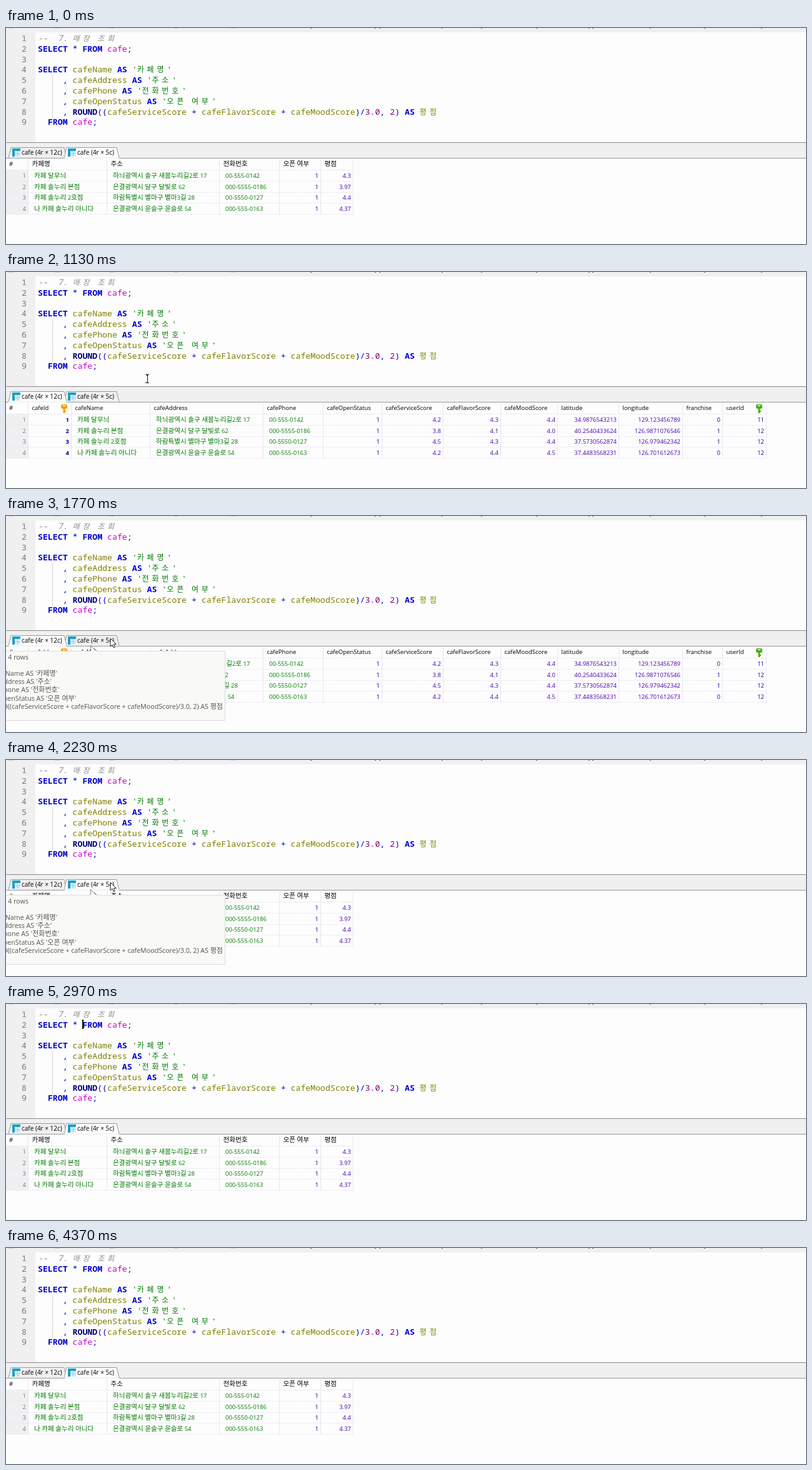
Animation, 1280 px wide and 346 px high, one loop 4410 ms. Source, as an HTML page:

```html
<!DOCTYPE html>
<html lang="ko">
<head>
<meta charset="utf-8">
<title>Cafe query</title>
<style>
html, body { margin: 0; width: 100%; height: 100%; overflow: hidden; background: #fdfdfd; }
svg { display: block; width: 1280px; height: 346px; }
text { font: 500 9.5px "Open Sans", "Noto Sans", sans-serif; white-space: pre; }
.h { font: 500 10.6px "Noto Sans CJK KR", "Noto Sans CJK", sans-serif; }
.code text { font: 13.22px "Noto Sans Mono", monospace; fill: #0000c8; }
.code .h { font-size: 12px; font-weight: 400; letter-spacing: 4.82px; }
.code .note { fill: #8c8c8c; font-style: italic; }
.code .note .h { font-style: italic; }
.code .num { fill: #777; }
.kw { fill: #0000d0; font-weight: bold; }
.fn { fill: #000080; font-weight: bold; }
.col { fill: #808000; }
.tbl { fill: #d000d0; }
.str { fill: #007a00; }
.lit { fill: #800080; }
.tab { font-size: 10px; }
.key { fill: #0000a0; font-weight: bold; }
.int { fill: #1800a8; }
.real { fill: #4800b0; }
.row { fill: #777; }
.tip text { font-size: 10.7px; font-weight: 400; fill: #555; }
.tip .h { font-size: 11px; font-weight: 400; }
.line { fill: none; shape-rendering: crispEdges; }
</style>
</head>
<body>
<svg id="stage" viewBox="0 0 1280 346"></svg>
<script>
const LOOP = 4410;
const PANEL = '#f0f0f1';

const hangul = s => s.replace(/[가-힣]+/g, '<tspan class="h">$&</tspan>');
const text = (x, y, s, cls = '', anchor = 'start') =>
  `<text x="${x}" y="${y}" class="${cls}" text-anchor="${anchor}">${hangul(s)}</text>`;
const rect = (x, y, w, h, fill) => `<rect x="${x}" y="${y}" width="${w}" height="${h}" fill="${fill}"/>`;
const line = (d, color, extra = '') => `<path class="line" d="${d}" stroke="${color}" ${extra}/>`;
const group = (id, body, cls = '') => `<g id="${id}" class="${cls}">${body}</g>`;

// Editor
const sql = [
  '--  7. 매장 조회',
  'SELECT * FROM cafe;',
  '',
  "SELECT cafeName AS '카페명'",
  "     , cafeAddress AS '주소'",
  "     , cafePhone AS '전화번호'",
  "     , cafeOpenStatus AS '오픈 여부'",
  '     , ROUND((cafeServiceScore + cafeFlavorScore + cafeMoodScore)/3.0, 2) AS 평점',
  '  FROM cafe;'
];

function tokenClass(s) {
  if (s[0] === "'") return 'str';
  if (s === 'ROUND') return 'fn';
  if (/^[A-Z]/.test(s)) return 'kw';
  if (s === 'cafe') return 'tbl';
  return /^\d/.test(s) ? 'lit' : 'col';
}

const highlight = s => s.replace(/'[^']*'|SELECT|FROM|AS|ROUND|cafe\w*|\d[\d.]*|[가-힣]+/g,
  m => `<tspan class="${tokenClass(m)}">${m}</tspan>`);

function editor() {
  const rows = sql.map((s, i) => {
    const y = 21 + 16.8 * i;
    return text(25, y, String(i + 1), 'num') +
      (i ? text(51, y, highlight(s)) : text(51, y, s, 'note'));
  });
  const specks = [487, 590, 597, 697, 760, 848, 932, 938, 1030, 1117, 1208];
  return rect(0, 0, 1280, 7, PANEL) + rect(0, 7, 47, 176, PANEL) +
    [4, 78, 165, 268, 360].map(x => rect(x, 0, 8, 1, '#ccccd4')).join('') +
    specks.map(x => rect(x, 0, 2, 1, '#666')).join('') +
    line('M74.5 76V143', '#aaa', 'stroke-dasharray="1 1"') + rows.join('');
}

// Result tabs
function tab(x, right, label, active) {
  const fill = active ? '#fdfdfd' : PANEL;
  const icon = rect(x + 6, 193, 13, 13, '#d4eef6') + rect(x + 6, 193, 13, 4, '#1a9fc0') +
    rect(x + 6, 193, 4, 13, '#1a9fc0') +
    line(`M${x + 10} 201.5h9M${x + 14.5} 197v9`, '#9ad0e2');
  return `<path d="M${x} 207.5L${x + 4} 191.5H${right - 4}L${right} 207.5" fill="${fill}" stroke="#999"/>` +
    icon + text(x + 21, 203, label, 'tab');
}

function tabs(active) {
  const list = [tab(4, 97, 'cafe (4r × 12c)', active === 0), tab(93, 181, 'cafe (4r × 5c)', active === 1)];
  const base = active ? 'M0 208.5H94M181 208.5H1280' : 'M0 208.5H4M97 208.5H1280';
  return (active ? list[0] + list[1] : list[1] + list[0]) + line(base, '#999');
}

// Result grids: each column is [left edge, title, kind, values]
const names = ['카페 달무늬', '카페 솔누리 본점', '카페 솔누리 2호점', '나 카페 솔누리 아니다'];
const places = ['하늬광역시 솔구 새봄누리길2로 17', '은결광역시 달구 달빛로 62',
  '하람특별시 별마구 별마3길 28', '은결광역시 윤슬구 윤슬로 54'];
const phones = ['00-555-0142', '000-5555-0186', '00-5550-0127', '000-555-0163'];
const open = [1, 1, 1, 1];

const summary = [
  [36, '카페명', 'str', names], [162, '주소', 'str', places], [342, '전화번호', 'str', phones],
  [438, '오픈 여부', 'int', open], [504, '평점', 'real', ['4.3', '3.97', '4.4', '4.37']]
];
const full = [
  [36, 'cafeId', 'key', [1, 2, 3, 4]],
  [105, 'cafeName', 'str', names],
  [231, 'cafeAddress', 'str', places],
  [412, 'cafePhone', 'str', phones],
  [508, 'cafeOpenStatus', 'int', open],
  [602, 'cafeServiceScore', 'real', ['4.2', '3.8', '4.5', '4.2']],
  [700, 'cafeFlavorScore', 'real', ['4.3', '4.1', '4.3', '4.4']],
  [792, 'cafeMoodScore', 'real', ['4.4', '4.0', '4.4', '4.5']],
  [883, 'latitude', 'real', ['34.9876543213', '40.2540433624', '37.5730562874', '37.4483568231']],
  [981, 'longitude', 'real', ['129.123456789', '126.9871076546', '126.979462342', '126.701612673']],
  [1083, 'franchise', 'int', [0, 1, 1, 0]],
  [1147, 'userId', 'int', [11, 12, 12, 12]]
];

function grid(cols, end) {
  const rowY = i => Math.round(240 + 17.6 * i);
  let out = rect(0, 228, 36, 70, PANEL) + text(5, 221, '#');
  for (let i = 0; i < 4; i++) {
    out += text(32, rowY(i), String(i + 1), 'row', 'end');
    out += line(`M0 ${Math.round(245 + 17.6 * i)}.5H${end}`, '#e6e6f4', 'stroke-dasharray="2 1"');
  }
  cols.forEach(([left, title, kind, values], c) => {
    const right = c + 1 < cols.length ? cols[c + 1][0] : end;
    out += line(`M${left - .5} 210V298M${right - .5} 210V298`, '#e6e6f2') + text(left + 5.5, 221, title);
    values.forEach((v, i) => {
      out += kind === 'str' ? text(left + 9, rowY(i), v, kind)
        : text(right - 4, rowY(i), String(v), kind, 'end');
    });
  });
  return out + line(`M0 227.5H${end}`, '#ececf4');
}

const keyIcon = (x, color) =>
  `<rect x="${x - 5}" y="212" width="10" height="7" rx="2.5" fill="${color}"/>` +
  rect(x - 2, 213.5, 4, 1.5, '#fff') + rect(x - 1.5, 219, 3, 7, color) + rect(x, 222, 3, 2, color);

// Balloon hint over the tab
function balloon() {
  const rows = [
    [36, 229.5, '4 rows'], [82, 256, "SELECT cafeName AS '카페명'"], [73, 269, ", cafeAddress AS '주소'"],
    [85, 282, ", cafePhone AS '전화번호'"], [112, 295.5, ", cafeOpenStatus AS '오픈 여부'"],
    [347, 309, ', ROUND((cafeServiceScore + cafeFlavorScore + cafeMoodScore)/3.0, 2) AS 평점']
  ];
  return '<path d="M-5 216.5H135.5V207.5L144.5 216.5H350.5V327.5H-5Z" fill="#f9f9f7" stroke="#dcdce0"/>' +
    line('M135.5 216V207.5L144.5 216', '#888') +
    rows.map(([x, y, s]) => text(x, y, s, '', 'end')).join('');
}

const stage = document.getElementById('stage');
stage.innerHTML =
  group('editor', editor(), 'code') +
  rect(0, 183, 1280, 26, PANEL) + line('M0 183.5H1280', '#888') +
  group('fullView', rect(0, 209, 1280, 137, '#fdfdfd') + tabs(0) + grid(full, 1217) +
    keyIcon(93, '#f5a010') + keyIcon(1205, '#48b010')) +
  group('summaryView', rect(0, 209, 1280, 137, '#fdfdfd') + tabs(1) + grid(summary, 556)) +
  group('blank', rect(0, 209, 1280, 137, '#f9f9f6')) +
  group('popup', line('M173.5 8V94', '#ccc') + line('M0 94.5H174', '#999')) +
  group('caret', rect(122, 25, 2, 15, '#000')) +
  group('hint', balloon(), 'tip') +
  group('arrow', '<path d="M0 0V13L3 10.2L5.2 15L7.4 14L5.3 9.4H9.3Z" fill="#fff" stroke="#222"/>') +
  group('beam', line('M-3 -6.5H-1L0 -5.5L1 -6.5H3M.5 -6V6M-3 6.5H3', '#111'));

const el = id => document.getElementById(id);
const show = (id, on) => el(id).setAttribute('visibility', on ? 'visible' : 'hidden');

// Pointer stops: [time, x, y]
const path = [[1000, 238, 158], [1130, 226, 171], [1450, 167, 196], [2520, 167, 196], [2700, 190, 150]];

function pointer(t) {
  const i = path.findIndex(([end], k) => k && t < end);
  if (i < 1 || t < path[0][0]) return null;
  const [t0, x0, y0] = path[i - 1], [t1, x1, y1] = path[i];
  const p = (t - t0) / (t1 - t0), e = p * p * (3 - 2 * p);
  return [x0 + (x1 - x0) * e, y0 + (y1 - y0) * e];
}

function draw(t) {
  const within = (a, b) => t >= a && t < b;
  const first = within(530, 2000);
  show('fullView', first);
  show('summaryView', !first);
  show('blank', within(400, 530));
  show('popup', within(430, 500));
  show('hint', within(1570, 2700));

  const blink = Math.floor(((t - 2700 + LOOP) % LOOP) / 530) % 2 === 0;
  show('caret', blink && !within(950, 2700));

  const at = pointer(t), inEditor = at && at[1] < 183;
  show('beam', inEditor);
  show('arrow', at && !inEditor);
  if (at) el(inEditor ? 'beam' : 'arrow').setAttribute('transform', `translate(${at})`);
}

const start = performance.now();
function tick() {
  draw((performance.now() - start) % LOOP);
  requestAnimationFrame(tick);
}
tick();
</script>
</body>
</html>
```
